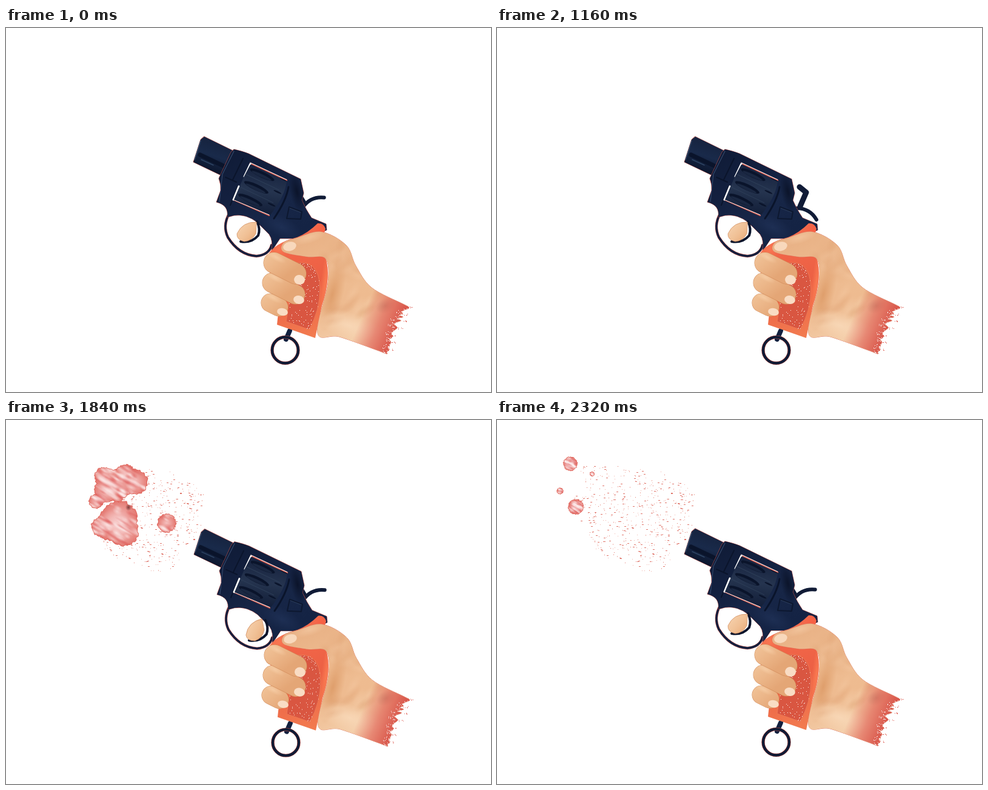
An HTML page with a canvas that plays this animation: 800x600 px, repeating every 2360 ms.

```html
<!DOCTYPE html>
<html lang="en">
<head>
<meta charset="utf-8">
<title>Revolver</title>
<style>
  html, body { margin: 0; width: 100%; height: 100%; overflow: hidden; background: #fff; }
  canvas { display: block; width: 100vw; height: 100vh; }
</style>
</head>
<body>
<canvas id="stage" width="800" height="600"></canvas>
<script>
const ctx = document.getElementById('stage').getContext('2d');
const LOOP = 2360, STEP = 40;
const NAVY = '#13203f', DARK = '#0a142b', EDGE = '#cf5548';

// ---- helpers ----
const noise = i => { const v = Math.sin(i * 127.1 + 3.7) * 43758.5453; return v - Math.floor(v); };
const lerp = (a, b, u) => a + (b - a) * u;
const mix = (a, b, u) => a.map((p, i) => [lerp(p[0], b[i][0], u), lerp(p[1], b[i][1], u)]);
const ramp = (t, t0, t1) => Math.min(1, Math.max(0, (t - t0) / (t1 - t0)));
const ease = u => u * u * (3 - 2 * u);

// closed Catmull-Rom curve
function smooth(p) {
  const path = new Path2D(), n = p.length, q = i => p[(i + n) % n];
  path.moveTo(...p[0]);
  for (let i = 0; i < n; i++) {
    const [a, b, c, d] = [q(i - 1), q(i), q(i + 1), q(i + 2)];
    path.bezierCurveTo(b[0] + (c[0] - a[0]) / 6, b[1] + (c[1] - a[1]) / 6,
      c[0] - (d[0] - b[0]) / 6, c[1] - (d[1] - b[1]) / 6, c[0], c[1]);
  }
  path.closePath();
  return path;
}
function gradient(x0, y0, x1, y1, ...colors) {
  const g = ctx.createLinearGradient(x0, y0, x1, y1);
  colors.forEach((c, i) => g.addColorStop(i / (colors.length - 1), c));
  return g;
}
function fill(path, color) { ctx.fillStyle = color; ctx.fill(path); }
function line(path, color, width) {
  ctx.strokeStyle = color; ctx.lineWidth = width;
  ctx.stroke(typeof path === 'string' ? new Path2D(path) : path);
}
function oval(x, y, rx, ry, turn, color) {
  ctx.beginPath(); ctx.ellipse(x, y, rx, ry, turn, 0, 7);
  ctx.fillStyle = color; ctx.fill();
}
function soft(x, y, rx, ry, turn, rgb, alpha) {
  ctx.save();
  ctx.translate(x, y); ctx.rotate(turn); ctx.scale(rx, ry);
  const g = ctx.createRadialGradient(0, 0, 0, 0, 0, 1);
  g.addColorStop(0, `rgba(${rgb},${alpha})`);
  g.addColorStop(1, `rgba(${rgb},0)`);
  ctx.fillStyle = g;
  ctx.fillRect(-1, -1, 2, 2);
  ctx.restore();
}
function clipped(path, draw) { ctx.save(); ctx.clip(path); draw(); ctx.restore(); }

// ---- gun ----
const frame = new Path2D('M376 200 Q390 203 400 207 L486 249 L491 272 L488 284 Q495 300 504 313 L528 323 L529 333 L500 347 L452 347 L438 368 Q441 350 434 340 L414 320 Q396 306 376 309 L365 312 Q368 292 347 287 L354 268 Q355 258 351 248 L371 205 Z');
const barrel = new Path2D('M327 179 L374 202 L355 243 L309 221 L321 184 Z');
const cylinder = new Path2D('M403 225 L463 252 Q461 276 436 308 L376 283 L385 262 L392 246 Z');
const grip = new Path2D('M514 322 Q524 321 527 331 Q517 360 527 378 Q537 410 521 458 L510 511 L447 489 L449 470 L430 378 Q440 355 480 345 Q498 338 514 322 Z');
const panel = new Path2D('M474 388 Q517 378 518 430 Q518 465 500 497 L462 484 L470 430 Z');

function drawHammer(cock) {
  ctx.save();
  ctx.translate(490, 300); ctx.rotate(-.94 * (1 - cock)); ctx.translate(-490, -300);
  line('M499 262 L510 271 L500 294', '#101b36', 9);
  line('M494 297 Q516 297 527 316', '#101b36', 6);
  ctx.restore();
}

function drawCylinder(turn) {
  line('M463 251 L403 223 M375 283 L434 309', EDGE, 2.4);
  line('M463 250 L403 222 M375 283 L434 308', '#fff', 1);
  line('M403 224 L393 245 M384 261 L375 283', '#fff', 3);
  fill(cylinder, gradient(410, 230, 400, 300, '#17233f', '#25344f', '#14203a'));
  clipped(cylinder, () => {
    ctx.translate(420, 266);
    ctx.rotate(.44);
    for (let i = -2; i < 3; i++) {
      const y = (i + turn) * 23;
      oval(-8, y, 22, 5, 0, DARK);
      oval(-8, y + 2, 18, 2.5, 0, '#1a2741');
      line(`M-32 ${y + 11} L28 ${y + 11}`, '#2c3d57', 1);
      oval(27, y - 8, 7, 1.5, 0, DARK);
    }
  });
}

function drawTrigger(pull) {
  ctx.save();
  ctx.translate(pull * 17, pull * 14);
  line('M414 319 Q420 331 416 342 Q405 355 387 352', DARK, 4);
  ctx.translate(398, 337);
  ctx.rotate(-.35 * pull);
  const tip = new Path2D('M15 -17 Q-8 -18 -17 2 Q-18 12 -5 15 Q8 14 14 2 Z');
  fill(tip, gradient(-15, -12, 16, 16, '#f6d1ad', '#f0c095', '#e6a673'));
  line(tip, '#cf8a5d', .7);
  ctx.restore();
}

function drawGun(cock, turn, pull) {
  ctx.lineJoin = ctx.lineCap = 'round';
  drawHammer(cock);
  const guard = 'M368 306 Q357 326 366 345 Q384 374 413 376 Q434 374 438 358';
  line(guard, EDGE, 4.4);
  line(guard, NAVY, 3.4);

  line(barrel, EDGE, 1);
  fill(barrel, gradient(335, 183, 320, 228, '#16233f', '#192a4a', '#0d1830'));
  line('M320 209 L358 227', DARK, 7);
  line('M322 217 L342 226', '#2f4564', 1.5);
  line('M321 186 L311 217', '#3a4f6d', 1.5);

  line(frame, EDGE, 1);
  fill(frame, gradient(380, 205, 470, 345, '#101c38', NAVY, '#172647', '#142344'));
  clipped(frame, () => {
    soft(455, 328, 38, 18, .5, '45,66,110', .35);
    soft(480, 270, 12, 34, -.2, '6,12,30', .7);
    line('M376 203 L357 241 L352 286', '#33476a', 1.2);
    line('M391 215 L374 250 M362 246 L380 254 M382 262 L370 292', DARK, 2);
    line('M466 262 Q462 285 442 314', DARK, 3);
  });
  drawCylinder(turn);
  line('M467 295 L488 303 L486 315 L463 314 Z', '#0d1830', 2);
  line('M468 297 L486 304', '#2b3c5a', 1);
  drawTrigger(pull);

  // lanyard
  line('M468 499 L462 513', NAVY, 8);
  for (const [color, width] of [[EDGE, 5.4], ['#101b35', 4.4]]) {
    ctx.beginPath(); ctx.arc(460.5, 531, 21.5, 0, 7);
    ctx.strokeStyle = color; ctx.lineWidth = width; ctx.stroke();
  }
}

function drawGrip() {
  fill(grip, gradient(450, 345, 500, 510, '#f4694b', '#ec6044', '#f27b50'));
  clipped(grip, () => {
    soft(520, 345, 14, 28, .1, '255,80,55', .6);
    soft(450, 365, 24, 16, -.5, '255,135,90', .5);
    soft(527, 420, 8, 70, .12, '255,130,85', .7);
  });
  fill(panel, '#d95641');
  line(panel, '#ee7a54', 1);
  clipped(panel, () => {
    // speckles crowd towards the top and bottom
    for (let i = 0; i < 200; i++) {
      const y = 442 + 54 * Math.cos(noise(i + 500) * Math.PI);
      ctx.fillStyle = '#fff3ee';
      ctx.fillRect(Math.round(462 + noise(i) * 54), Math.round(y), 1, 1);
    }
  });
}

// ---- hand ----
const wrist = Array.from({ length: 28 }, (_, i) => {
  const v = i / 27;
  return [629 + 33 * (1 - v) ** 1.6 + (noise(i + 40) - .5) * lerp(13, 4, v), 459 + 78 * v];
});
const arm = [[603, 428], [655, 455], ...wrist, [612, 531], [550, 509], [514, 503], [531, 420]];
const handRest = [[527, 380], [497, 377], [458, 369], [458, 354], [480, 346], [520, 336], [561, 358], [577, 392]];
const handUp = [[528, 362], [528, 322], [517, 292], [522, 273], [540, 291], [563, 299], [572, 345], [580, 385]];

function drawFingers() {
  for (let i = 2; i >= 0; i--) {
    const x = 442 - i * 3, y = 387 + i * 33;
    const reach = [36, 38, 14][i], thick = 34 - i * 2;
    const bone = `M${x} ${y} L${x + reach} ${y + reach / 2}`;
    line(bone, '#cf8654', thick + 1);
    line(bone, gradient(x - 15, y - 20, x + 18, y + 24, '#f2c69c', '#ecb78a', '#e4a676'), thick);
    soft(x + 4, y - 9, 18, 6, .5, '252,218,182', .5);
    oval(x + reach + 6, y + reach / 2 + 10 - i, 9, 8 - i, .2, '#f9dcc4');
  }
}

function drawHand(lift) {
  const hand = smooth([...mix(handRest, handUp, lift), ...arm]);
  line(hand, '#dd7a62', 1);
  fill(hand, gradient(510, 345, 575, 515, '#e9b286', '#eebc91', '#eebb90', '#f4cfab'));
  clipped(hand, () => {
    soft(538, 440, 18, 62, .25, '208,130,72', .5);
    soft(555, 385 - lift * 12, 26, 40, -.5, '218,152,104', .35);
    soft(565, 490, 60, 22, .3, '250,221,190', .7);
    soft(500 + lift * 48, 345 - lift * 25, 30, 10, -.3 + lift * 1.4, '248,210,174', .5);
    for (let i = 0; i < 26; i++)  // watercolour blotches
      soft(525 + noise(i) * 90, 350 + noise(i + 60) * 150, 22, 9, noise(i + 90) * 3,
        i % 2 ? '250,214,180' : '214,146,98', .22);
    soft(626, 458, 17, 12, -.4, '112,88,72', .3);
    ctx.fillStyle = gradient(586, 478, 642, 502, 'rgba(222,86,78,0)', 'rgba(222,88,78,.6)', '#d9584c');
    ctx.fillRect(560, 420, 120, 130);
  });
  for (let i = 0; i < 140; i++) {
    const [x, y] = wrist[i % 28], out = i % 4 === 0;
    ctx.fillStyle = out ? '#dd5a4f' : '#fff';
    ctx.fillRect(Math.round(x + noise(i + 70) * (out ? 9 : -11)), Math.round(y + noise(i + 7) * 3), 1, 1);
  }
  oval(468 + lift * 58, 360 - lift * 74, 11, 7.5, -.25 + lift * 1.3, '#f8d8bc');
}

// ---- smoke ----
// each lobe: start, radius, resting place; lobes drift, gather and shrink
const UP = [121, 72], LOW = [130, 143], TAIL = [240, 168];
const lobes = [
  [199, 113, 20, UP], [267, 105, 21, UP], [235, 140, 35, UP], [298, 130, 27, UP], [207, 158, 26, UP],
  [181, 206, 21, LOW], [215, 200, 34, LOW], [252, 217, 34, LOW], [240, 180, 38, LOW],
  [288, 172, 32, TAIL], [190, 150, 15, [104, 117]], [225, 150, 10, [157, 89]]
];

function lobesAt(t) {
  const u = ramp(t, 1520, 2320), drift = u ** .8;
  return lobes.map(([x, y, r, end]) => ({
    x: lerp(x, end[0], drift), y: lerp(y, end[1], drift),
    r: r * (end === TAIL ? (1 - u) ** 1.6 : 1 - .7 * u)
  }));
}
function cloudOf(list) {
  const cloud = new Path2D();
  list.forEach(({ x, y, r }, n) => {
    const ring = new Path2D();
    for (let i = 0; i < 48; i++) {
      const a = i * Math.PI / 24, d = r * (1.02 + (noise(n * 48 + i) - .5) * .18);
      ring.lineTo(x + d * Math.cos(a), y + d * Math.sin(a));
    }
    ring.closePath();
    cloud.addPath(ring);
  });
  return cloud;
}

// specks stay behind wherever the cloud has passed
const dust = [];
const passes = [1520, 1680, 1840, 2000].map(t => [t, cloudOf(lobesAt(t))]);
for (let i = 0; i < 900; i++) {
  const x = Math.round(105 + noise(i) * 225), y = Math.round(62 + noise(i + 1000) * 192);
  const pass = passes.find(([, cloud]) => ctx.isPointInPath(cloud, x, y));
  if (pass) dust.push([x, y, pass[0], noise(i + 2000)]);
}

function drawSmoke(t) {
  if (t < 1440) return;
  for (const [x, y, born, v] of dust) {
    if (t <= born) continue;
    ctx.fillStyle = v < .5 ? '#e0776c' : '#f0b3aa';
    ctx.fillRect(x, y, v < .3 ? 3 : 1, v > .85 ? 2 : 1);
  }
  const list = lobesAt(t), cloud = cloudOf(list), u = ramp(t, 1520, 2320);
  const grow = lerp(.3, 1, ramp(t, 1440, 1520));
  ctx.save();
  ctx.translate(318, 198); ctx.scale(grow, grow); ctx.translate(-318, -198);
  line(cloud, '#de5b50', 1.6);
  fill(cloud, '#e57d76');
  clipped(cloud, () => {
    for (const { x, y, r } of list) soft(x, y, r, r, 0, '250,216,216', .75);
    const size = 1 - .55 * u;
    list.forEach(({ x, y, r }, n) => {
      for (let i = 0; i < 14; i++) {
        const s = n * 14 + i, pale = i % 3;
        soft(x + (noise(s) - .5) * r * 2.2, y + (noise(s + 300) - .5) * r * 2.2,
          (8 + noise(s + 600) * 16) * size, (3 + noise(s + 900) * 4) * size, .55,
          pale ? '255,246,246' : '218,76,76', pale ? .5 : .42);
      }
    });
  });
  ctx.restore();

  // dark chip that shows through halfway
  const chip = Math.sin(Math.PI * ramp(t, 1780, 2220));
  soft(202, 144, 12 * chip, 14 * chip, 0, '110,50,50', .9);
  soft(206, 140, 6 * chip, 4 * chip, .5, '250,225,222', .8);
}

function draw(t) {
  ctx.setTransform(1, 0, 0, 1, 0, 0);
  ctx.fillStyle = '#fff';
  ctx.fillRect(0, 0, 800, 600);
  drawSmoke(t);

  const kick = t < 1600 ? ramp(t, 1440, 1600) ** 1.5 : (1 - ramp(t, 1600, 1960)) ** 2;
  const lift = ease(ramp(t, 600, 760)) - ease(ramp(t, 840, 1160));
  const cock = ramp(t, 640, 760) - ramp(t, 1440, 1480);
  const pull = ramp(t, 1400, 1480) - ramp(t, 1760, 2080);
  ctx.translate(kick * 9, kick * 6);
  drawGun(cock, ease(ramp(t, 640, 760)) % 1, pull);
  drawGrip();
  drawHand(lift);
  drawFingers();
}

let start;
function tick(now) {
  start ??= now;
  draw(Math.floor((now - start) % LOOP / STEP) * STEP);
  requestAnimationFrame(tick);
}
requestAnimationFrame(tick);
</script>
</body>
</html>
```
